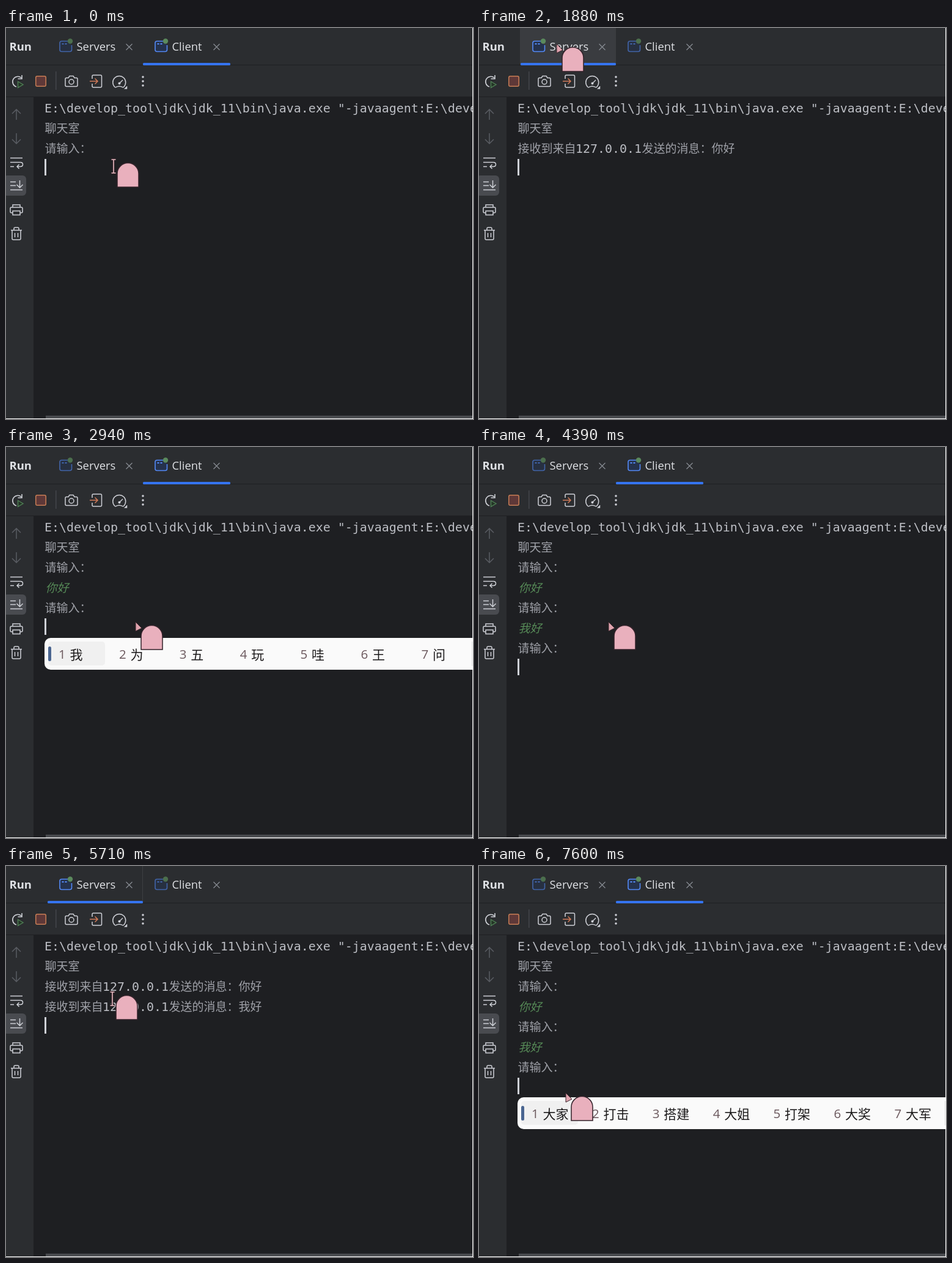
Recreate the animation shown at these times as an HTML page with a canvas. Size 764 by 639 pixels, loop 7.99 s.

```html
<!DOCTYPE html>
<html lang="zh-CN">
<head>
<meta charset="utf-8">
<style>
html, body { margin: 0; width: 100%; height: 100%; overflow: hidden; background: #1e1f22 }
canvas { display: block }
</style>
</head>
<body>
<canvas id="stage" width="764" height="639"></canvas>
<script>
const g = document.getElementById('stage').getContext('2d');
const LOOP = 7990;
const UI = '"Open Sans", sans-serif';
const CJK = '"Noto Sans CJK SC", "Noto Sans CJK", sans-serif';
const MONO = '19.93px "DejaVu Sans Mono", monospace';
const LIGHT = '300 19px ' + CJK;
const ICON = '#ced0d6', DIM = '#5a5d63', PANEL = '#2b2d30', LINE = '#1e1f22';

const tabs = [
  { name: 'Servers', x: 68, w: 156, icon: 87 },
  { name: 'Client', x: 224, w: 143, icon: 243 }
];

// pointer hotspot: time, x, y
const track = [
  [0, 176, 226], [1340, 176, 226], [1740, 127, 26], [2080, 127, 26],
  [2350, 285, 25], [2420, 285, 25], [2680, 212, 274], [2939, 212, 274],
  [2940, 212, 286], [4390, 212, 286], [5000, 140, 18], [5300, 140, 18],
  [5710, 174, 217], [5980, 176, 222], [6050, 176, 222], [6320, 300, 30],
  [6400, 300, 30], [6470, 273, 56], [6990, 142, 361], [7189, 142, 361],
  [7190, 142, 371], [LOOP, 142, 371]
];

// candidate lists: start, end, words
const typing = [
  [70, 160, '你 年 那 呢 女 内 能'],
  [160, 260, '你 呢 尼 泥 拟 逆 腻'],
  [260, 380, '你好 你会 你和 你还 你很 你 呢'],
  [380, 540, '你哈 你好 你还 你海 你 呢 尼'],
  [540, 1010, '你好 拟好 你号 你 呢 尼 泥'],
  [2940, 3000, '我 为 五 玩 哇 王 问'],
  [3000, 3130, '我 窝 握 卧 沃 喔 涡'],
  [3130, 3260, '我和 我会 我还 我很 我后 我 窝'],
  [3260, 3400, '我哈 我还 我好 我海 我 窝 握'],
  [3400, 3660, '我好 我号 握好 我 窝 握 卧'],
  [7190, 7270, '的 到 都 大 对 等 多'],
  [7270, 7400, '大 打 达 答 搭 哒 嗒'],
  [7400, 7480, '大家 打击 大姐 大街 大将 大军 大奖'],
  [7480, 7600, '大家 打击 大计 大姐 打架 大吉 大集'],
  [7600, LOOP, '大家 打击 搭建 大姐 打架 大奖 大军']
];
const blinkOff = [[750, 1010], [1450, 1740], [2250, 2400], [4700, 5000], [6200, 6530]];

const within = (t, list) => list.find(([a, b]) => t >= a && t < b);

function rect(x, y, w, h, color, r = 0) {
  g.fillStyle = color;
  g.beginPath();
  g.roundRect(x, y, w, h, r);
  g.fill();
}
function text(s, x, y, font, color) {
  g.font = font;
  g.fillStyle = color;
  g.fillText(s, x, y);
}
function path(d, color, width = 1.5, fill) {
  const p = new Path2D(d);
  if (fill) { g.fillStyle = fill; g.fill(p); }
  g.strokeStyle = color;
  g.lineWidth = width;
  g.stroke(p);
}
function dot(x, y, r, color) {
  g.fillStyle = color;
  g.beginPath();
  g.arc(x, y, r, 0, 7);
  g.fill();
}

function pointerAt(t) {
  const i = Math.max(1, track.findIndex(k => k[0] > t));
  const [t0, x0, y0] = track[i - 1], [t1, x1, y1] = track[i];
  const u = (t - t0) / (t1 - t0), e = u * u * (3 - 2 * u);
  return [x0 + (x1 - x0) * e, y0 + (y1 - y0) * e];
}

function drawTabs(active, mx, my) {
  if (active === 0) rect(223, 0, 1, 57, '#3d3f43');
  tabs.forEach((tab, i) => {
    const on = i === active;
    if (my < 60 && mx >= tab.x && mx < tab.x + tab.w) rect(tab.x - 1, 0, tab.w + 1, 60, '#3a3c40');
    const x = tab.icon;
    g.globalAlpha = on ? 1 : 0.6;
    path(`M${x + 14} 21.5H${x + 4}q-3 0-3 3v11q0 3 3 3h13.5q3 0 3-3V28`, '#548af7', 1.6, '#25324d');
    rect(x + 4.5, 25, 3, 2, '#548af7');
    rect(x + 9.5, 25, 3, 2, '#548af7');
    g.globalAlpha = 1;
    dot(x + 18, 21.5, 4.2, on ? '#5b8a5d' : '#4c6f4d');
    text(tab.name, x + 28.5, 37, '18.4px ' + UI, '#dfe1e5');
    const c = tab.x + tab.w - 22.5;
    path(`M${c - 5} 26l10 10m0-10l-10 10`, '#868a91', 1.3);
  });
  const { x, w } = tabs[active];
  rect(x, 57, w, 4, '#3574f0', 1.5);
}

function drawToolbar() {
  // rerun, stop
  path('M25 81.5A8.5 8.5 0 1 0 17 96M26 77v6h-6.5', ICON, 1.6);
  path('M19.5 87.5l8.5 5-8.5 5z', '#4f7f55', 1.4, '#253627');
  rect(48, 78, 18, 18, '#c77d55', 3);
  rect(49.5, 79.5, 15, 15, '#5e3838', 1.5);
  rect(81, 71, 1.5, 30, '#43454a');
  // camera
  path('M99 81.5h3l2-3h6l2 3h3q2 0 2 2v10q0 2-2 2H99q-2 0-2-2v-10q0-2 2-2z', ICON);
  path('M111 88a4 4 0 1 0-8 0a4 4 0 1 0 8 0', ICON);
  // exit
  path('M141 83v-4q0-2 2-2h11.5q2 0 2 2v16q0 2-2 2H143q-2 0-2-2v-4', ICON);
  path('M137 87h13m-4.5-4.5l4.5 4.5-4.5 4.5', '#d07a58');
  // gauge
  path('M178 96.5a10.5 10.5 0 1 1 14.5 0q-1 .7-2 .2q-5.500-3-10.5 0q-1 .5-2-.2z', ICON);
  path('M186 90l5-5', ICON);
  dot(185.5, 90.5, 2, ICON);
  path('M198 95v4.5h-4.5z', ICON, 0.5, ICON);
  for (const y of [80, 87, 94]) dot(224, y, 1.8, ICON);
}

function drawSidebar() {
  path('M17 150v-17m-7 7l7-7 7 7', DIM);
  path('M17 172v17m-7-7l7 7 7-7', DIM);
  path('M7 212.5h20M7 219.5h16.5q4 0 4 3.5t-4 3.5H18m3.5-3.5l-3.5 3.5 3.5 3.5M7 226.5h6', ICON);
  rect(-4, 241, 37, 33, '#494b50', 6);
  path('M7 251.5h9M7 257.5h9M7 264.5h20M22.5 249v12m-5-5l5 5 5-5', ICON);
  // printer
  path('M11 293v-4h12v4M11 302H9q-2 0-2-2v-5q0-2 2-2h16q2 0 2 2v5q0 2-2 2h-2M11 299h12v6.5H11z', ICON);
  // trash
  path('M8 330.5h18M13 330v-2q0-2 2-2h4q2 0 2 2v2M10 331v13q0 2 2 2h10q2 0 2-2v-13M14.5 335v7M19.5 335v7', ICON);
}

function drawConsole(t, active) {
  g.save();
  g.beginPath();
  g.rect(45, 113, 718, 520);
  g.clip();
  const gray = '#bcbec4', soft = '#9fa1a8', left = 63.5;
  const base = row => 138 + row * 33;
  let row = 2, caretX = 63;
  const prompt = () => text('请输入：', left, base(row++), LIGHT, soft);
  const entry = s => text(s, left + 1, base(row++), 'italic ' + LIGHT, '#568a57');
  const received = s => {
    text('接收到来自', left, base(row), LIGHT, soft);
    text('127.0.0.1', 158, base(row), MONO, gray);
    text('发送的消息：' + s, 266.5, base(row++), LIGHT, soft);
  };

  text('E:\\develop_tool\\jdk\\jdk_11\\bin\\java.exe "-javaagent:E:\\develop_tool', 63, 138, MONO, gray);
  text('聊天室', left, base(1), LIGHT, soft);
  if (active === 0) {
    received('你好');
    if (t > 3990) received('我好');
  } else {
    prompt();
    [['你好', 1010, 1210], ['我好', 3660, 3990]].forEach(([word, shown, sent]) => {
      if (t < shown) return;
      entry(word);
      if (t >= sent) prompt();
      else { row--; caretX = 101; }
    });
  }
  const top = 116 + row * 33;
  if (!within(t, blinkOff)) rect(caretX, top - 1, 3, 27, '#ced0d6');
  g.restore();
  return top;
}

function drawCandidates(words, y) {
  rect(63, y, 720, 52, '#fafafa', 10);
  rect(69, y + 6, 93, 39, '#f0f0f0', 5);
  rect(69, y + 14, 5, 24, '#4a6590', 2.5);
  words.split(' ').forEach((word, i) => {
    const x = 86 + i * 98.9;
    text(i + 1, x, y + 34, '20.5px ' + UI, '#6b585d');
    text(word, x + 18.5, y + 34.5, '21px ' + CJK, '#1c1a1b');
  });
  rect(762, y + 6, 1, 40, '#dcdcdc');
}

function drawPointer(t, x, y) {
  const beam = y > 112 && (t < 1600 || (t > 5400 && t < 6200));
  g.save();
  g.translate(x, y);
  if (beam) {
    const d = 'M-3.5-11h7M0-11v22M-3.5 11h7';
    path(d, '#2a1c22', 4);
    path(d, '#e9bcc4', 1.6);
    g.translate(5, -6);
  } else {
    path('M0 0v15l10-5z', '#3a262c', 1, '#dfa3ae');
    g.translate(8, 5);
  }
  path('M1 40V18a17.5 17.5 0 0 1 35 0v22z', '#33222a', 1.5, '#e9b0bd');
  g.restore();
}

function draw(t) {
  const [mx, my] = pointerAt(t);
  const active = within(t, [[1740, 2400], [5240, 6530]]) ? 0 : 1;
  rect(0, 0, 764, 639, LINE);
  rect(0, 0, 764, 112, PANEL);
  rect(0, 60, 764, 1, LINE);
  rect(0, 113, 45, 526, PANEL);
  text('Run', 5.5, 37, 'bold 18.5px ' + UI, '#dfe1e5');
  drawTabs(active, mx, my);
  drawToolbar();
  drawSidebar();
  const top = drawConsole(t, active);
  rect(65, 633.5, 699, 5, '#4a4c50');
  const list = within(t, typing);
  if (list) drawCandidates(list[2], top + 31);
  drawPointer(t, mx, my);
  rect(763, 0, 1, 639, '#fff');
  rect(0, 638, 764, 1, '#fff');
}

function tick(now) {
  draw(now % LOOP);
  requestAnimationFrame(tick);
}
draw(0);
requestAnimationFrame(tick);
</script>
</body>
</html>
```
